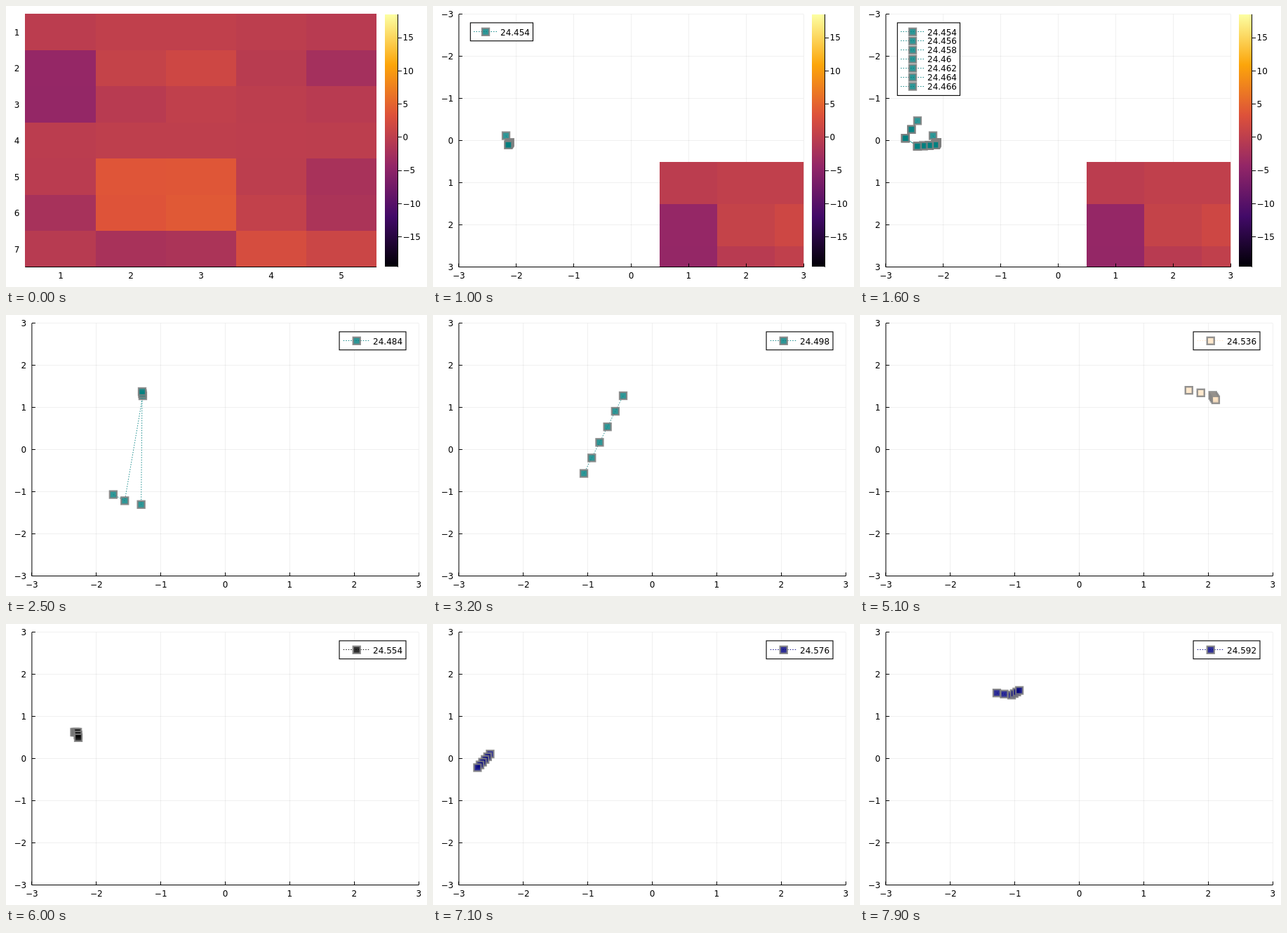
An HTML page with a canvas for the animation above (8000 ms loop, 600 by 400 pixels).

```html
<!DOCTYPE html>
<html lang="en">
<head>
<meta charset="utf-8">
<title>Heatmap and trace</title>
<style>
  html, body { margin: 0; width: 100%; height: 100%; overflow: hidden; background: #fff; }
  canvas { display: block; }
</style>
</head>
<body>
<canvas width="600" height="400"></canvas>
<script>
const ctx = document.querySelector('canvas').getContext('2d');
const LOOP = 8000, STEP = 100, INTRO = 10;   // the heatmap stands alone for INTRO steps
const TRAIL = 6, HEAT_STEPS = 7;
const ROWS = 7, COLS = 5;
const TOP = 11.8, BOTTOM = 371.8, AXIS_Y = 371.5;
const INK = '#000', GRID = 'rgba(0,0,0,.06)';

const INFERNO = ['#000004', '#420a68', '#932667', '#dd513a', '#fca50a', '#fcffa4'];
const V_MIN = -19.5, V_MAX = 18.5;

// The heatmap is a sum of round bumps: column, row, height.
const BUMPS = [
  [2.5, 5.55, 9], [1, 2.5, -6.2], [2.5, 2, 2.4], [2.5, 7, -3.3],
  [5.2, 5.5, -3.3], [5, 2, -2.6], [4.3, 7, 3], [1, 6, -2.4]
];

const COLORS = [[0, '0,128,128'], [35, '255,228,196'], [45, '0,0,0'], [58, '0,0,128']];

// Turning points of the trace: step, x, y. It moves evenly between them.
const PATH = [
  [-5, -2.18, -.12], [-4, -2.11, .04], [0, -2.14, .1], [3, -2.45, .13], [4, -2.66, -.06],
  [6, -2.45, -.475], [11, -1.56, -1.21], [12, -1.28, 1.28], [14, -1.29, 1.38], [15, -1.305, -1.3],
  [23, -.33, 1.65], [24, .02, 1.66], [25, .75, 1.03], [26, 1.38, .79], [27, 1.25, -.07],
  [28, 1.37, -.21], [36, 1.7, 1.41], [38, 2.07, 1.29], [42, 2.13, 1.15], [43, -2.75, .9],
  [45, -2.34, .63], [48, -2.29, .63], [50, -2.28, .5], [63, -2.79, -.34],
  [64, -1.28, 1.56], [66, -1.05, 1.51], [69, -.93, 1.62]
];

const lerp = (a, b, f) => a + (b - a) * f;
const range = (from, to) => Array.from({ length: to - from + 1 }, (_, i) => from + i);
const crisp = v => Math.floor(v) + 0.5;
const number = n => String(n).replace('-', '\u2212');
const colorAt = step => COLORS.filter(c => c[0] <= step).pop()[1];
const labelAt = step => String(+(24.454 + step * 0.002).toFixed(3));

function position(step) {
  const i = Math.max(1, PATH.findIndex(p => p[0] >= step));
  const [s0, x0, y0] = PATH[i - 1], [s1, x1, y1] = PATH[i];
  const f = (step - s0) / (s1 - s0);
  return [lerp(x0, x1, f), lerp(y0, y1, f)];
}

const heatAt = (col, row) => BUMPS.reduce((sum, [c, r, height]) =>
  sum + height * Math.exp(-((col - c) ** 2 + (row - r) ** 2) / 0.64), 0);

function inferno(v) {
  const p = (v - V_MIN) / (V_MAX - V_MIN) * (INFERNO.length - 1), i = Math.floor(p);
  const rgb = n => [1, 3, 5].map(k => parseInt(INFERNO[n].slice(k, k + 2), 16));
  const next = rgb(i + 1);
  return `rgb(${rgb(i).map((c, k) => Math.round(lerp(c, next[k], p - i)))})`;
}

function line(points, color) {
  ctx.strokeStyle = color;
  ctx.lineWidth = 1;
  ctx.beginPath();
  points.forEach(p => ctx.lineTo(...p));
  ctx.stroke();
}

function dotted(points, rgb) {
  ctx.setLineDash([1.5, 2]);
  line(points, `rgba(${rgb},.9)`);
  ctx.setLineDash([]);
}

function text(str, x, y, align) {
  ctx.textAlign = align;
  ctx.fillStyle = INK;
  ctx.fillText(str, x, y + 4.4);
}

function marker(x, y, rgb) {
  ctx.fillStyle = `rgba(${rgb},.82)`;
  ctx.fillRect(x - 5, y - 5, 10, 10);
  ctx.strokeStyle = 'rgba(128,128,128,.85)';
  ctx.lineWidth = 2.4;
  ctx.strokeRect(x - 5, y - 5, 10, 10);
}

function heatmap(left, top, w, h) {
  for (let r = 0; r < ROWS; r++) for (let c = 0; c < COLS; c++) {
    const x = Math.round(left + c * w), y = Math.round(top + r * h);
    ctx.fillStyle = inferno(heatAt(c + 1, r + 1));
    ctx.fillRect(x, y, Math.round(left + (c + 1) * w) - x, Math.round(top + (r + 1) * h) - y);
  }
}

function colorbar() {
  const fill = ctx.createLinearGradient(0, BOTTOM, 0, TOP);
  INFERNO.forEach((c, i) => fill.addColorStop(i / (INFERNO.length - 1), c));
  ctx.fillStyle = fill;
  ctx.fillRect(540, 12, 18, 359);
  line([[558.5, TOP], [558.5, BOTTOM]], INK);
  for (let v = -15; v <= 15; v += 5) {
    const y = 186.8 - v * 9.45;
    line([[558, crisp(y)], [564, crisp(y)]], INK);
    text(number(v), 565.5, y, 'left');
  }
}

function frame(left, right) {
  line([[left, TOP], [left, AXIS_Y], [right, AXIS_Y]], INK);
}

function drawIntro() {
  frame(27.5, 528);
  heatmap(27.4, 11.4, 100.12, 51.43);
  range(1, COLS).forEach(c => text(c, c * 100 - 22, 383.4, 'center'));
  range(1, ROWS).forEach(r => text(r, 19.4, r * 51.43 - 13.8, 'right'));
  colorbar();
}

function legend(left, right, lineStart, lineEnd, textX, steps) {
  const pitch = 12.95, top = 23.9;
  const box = [left, top, right - left, 25.8 + (steps.length - 1) * pitch];
  ctx.fillStyle = '#fff';
  ctx.fillRect(...box);
  ctx.strokeStyle = INK;
  ctx.lineWidth = 1.1;
  ctx.strokeRect(...box);
  steps.forEach((s, i) => {
    const y = top + 12.9 + i * pitch;
    dotted([[lineStart, crisp(y)], [lineEnd, crisp(y)]], colorAt(s));
    marker((lineStart + lineEnd) / 2, y, colorAt(s));
    text(labelAt(s), textX, y + 0.3, 'left');
  });
}

function trail(step, toX, toY) {
  const rgb = colorAt(step);
  const points = range(step - TRAIL + 1, step).map(s => {
    const [x, y] = position(s);
    return [toX(x), toY(y)];
  });
  dotted(points, rgb);
  points.forEach(p => marker(...p, rgb));
}

function drawTrace(step) {
  const heat = step < HEAT_STEPS;
  const left = 36.9, right = heat ? 528.2 : 588.2, unit = (right - left) / 6;
  const toX = x => left + (x + 3) * unit;
  const toY = y => 191.8 + (heat ? y : -y) * 60;
  const ticks = range(-3, 3);

  ticks.forEach(n => {
    const x = crisp(toX(n)), y = crisp(toY(n));
    line([[x, TOP], [x, BOTTOM]], GRID);
    line([[left, y], [right, y]], GRID);
  });

  if (heat) {
    ctx.save();
    ctx.beginPath();
    ctx.rect(left, TOP, right - left, BOTTOM - TOP);
    ctx.clip();
    heatmap(toX(0.5), toY(0.5), unit, 60);
    ctx.restore();
  }

  frame(left, right);
  ticks.forEach(n => {
    const x = toX(n), y = toY(n);
    line([[crisp(x), AXIS_Y], [crisp(x), AXIS_Y - 5]], INK);
    line([[left, crisp(y)], [left + 5, crisp(y)]], INK);
    text(number(n), x, 383.4, 'center');
    text(number(n), 29.2, y, 'right');
  });

  if (heat) {
    const steps = range(0, step);
    steps.forEach(s => trail(s, toX, toY));
    colorbar();
    legend(53.3, 142.5, 58, 92, 96, steps);
  } else {
    trail(step, toX, toY);
    ctx.textAlign = 'left';
    const textX = 564.4 - ctx.measureText(labelAt(step)).actualBoundingBoxRight;
    legend(textX - 48, 570, textX - 42.3, textX - 4.3, textX, [step]);
  }
}

function render(time) {
  const step = Math.floor((time % LOOP) / STEP) - INTRO;
  ctx.fillStyle = '#fff';
  ctx.fillRect(0, 0, 600, 400);
  ctx.font = '12px "DejaVu Sans", sans-serif';
  if (step < 0) drawIntro();
  else drawTrace(step);
}

const start = performance.now();
function tick() {
  render(performance.now() - start);
  requestAnimationFrame(tick);
}
tick();
</script>
</body>
</html>
```
